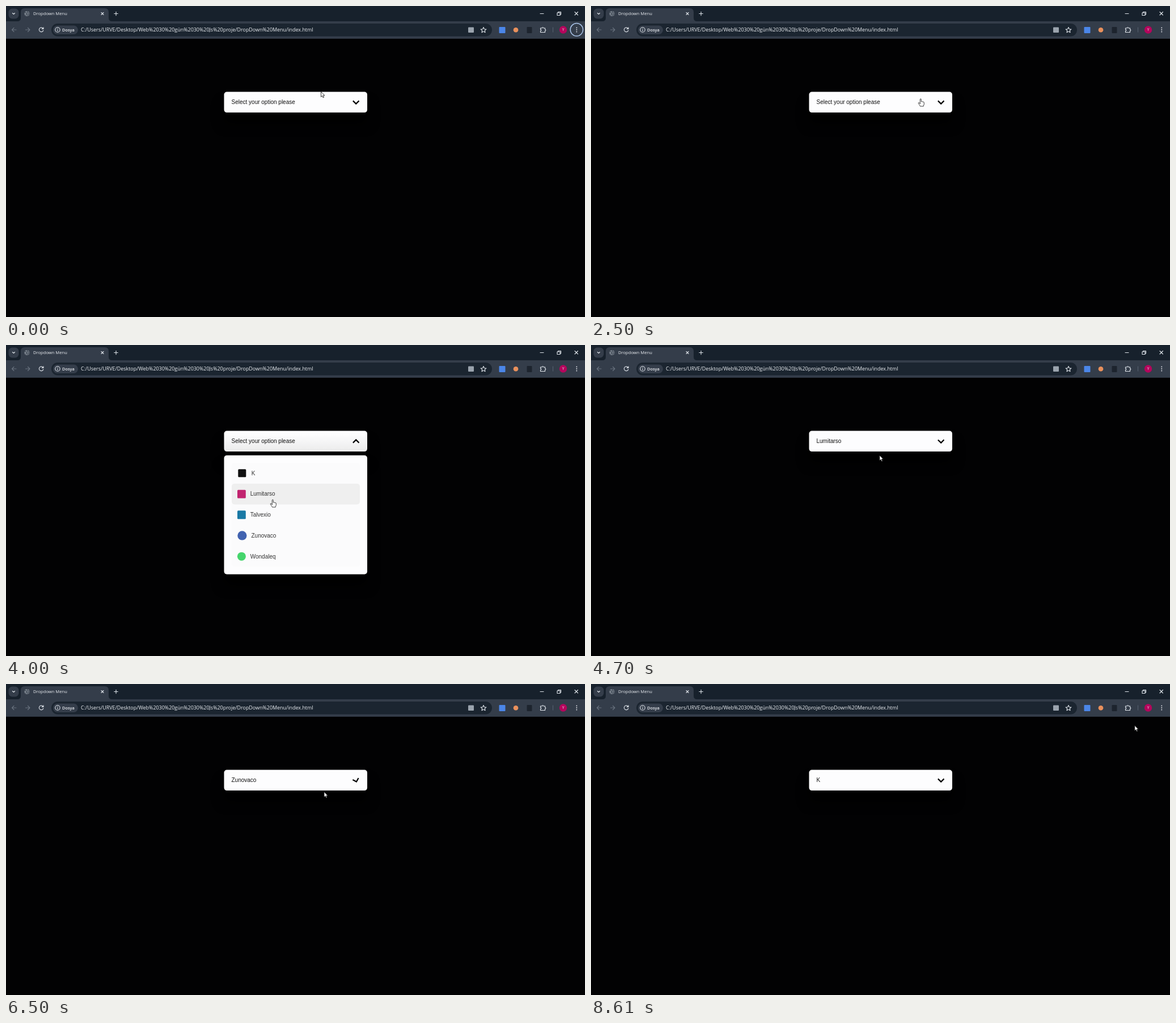
Recreate the animation shown at these times as an HTML page. Size 1021 by 549 pixels, loop 8.65 s.

```html
<!DOCTYPE html>
<html lang="tr">
<head>
<meta charset="utf-8">
<title>Dropdown Menu</title>
<style>
html, body { margin: 0; width: 100%; height: 100%; overflow: hidden; background: #020203; }
svg { display: block; }
.ui { font: 7.6px "Open Sans", "Noto Sans", sans-serif; fill: #eceff3; }
.ui .url { font-size: 8.94px; }
.ui .chip { font-size: 7.4px; font-weight: 600; }
.ui .badge { font-size: 6.5px; text-anchor: middle; }
.page { font: 10px "Liberation Sans", Arial, sans-serif; fill: #111; }
.line { fill: none; stroke: #dfe4ea; stroke-width: 1.1; stroke-linecap: round; stroke-linejoin: round; }
.line.dim { stroke: #69737f; }
.line.globe { stroke: #343d4a; }
.shadow { filter: drop-shadow(0 20px 10px #000); }
</style>
</head>
<body>
<svg width="1021" height="549" viewBox="0 0 1021 549">
  <defs>
    <linearGradient id="shade" x2="0" y2="1">
      <stop offset=".15" stop-color="#fdfdfe"/><stop offset="1" stop-color="#ebebeb"/>
    </linearGradient>
  </defs>

  <!-- browser window -->
  <g class="ui">
    <path fill="#17212c" d="M0 0H1021V27H0z"/>
    <path fill="#343d4a" d="M0 27H20Q26 27 26 21V11Q26 4 33 4H174Q181 4 181 11V21Q181 27 187 27H1021V57.700H0z"/>
    <rect x="4.5" y="4.5" width="18" height="18" rx="6.5" fill="#343d4a"/>
    <rect x="80" y="31" width="777" height="22.5" rx="11.2" fill="#1b2530"/>
    <rect x="83" y="34.5" width="44" height="15.5" rx="7.7" fill="#343d4a"/>
    <circle cx="37" cy="13.5" r="4.6" fill="#7c858f"/>
    <path class="line globe" d="M33.5 11.5l3 1 .5 2-2 1.5M37.5 9.5l1 2.5 2.5.5M38 17l1-2 2-.5"/>
    <path class="line" d="M11.5 12.500l2 2 2-2M168 11.500l4 4m0-4l-4 4M190.800 13.500h6.500m-3.250-3.250v6.500M942 13.500h6M1003 10.500l5.500 5.500m0-5.500l-5.500 5.500M972 12h5v4.500h-5zM973.500 12v-1.500h5v4.500h-1.500"/>
    <path class="line dim" d="M18 42h-7.500m3.500-3.500l-3.500 3.500 3.500 3.500M34.500 42h7.500m-3.500-3.500l3.500 3.500-3.500 3.500"/>
    <path class="line" d="M65.500 40a3.800 3.800 0 1 0 .3 3M66 37.800v2.600h-2.600"/>
    <circle class="line" cx="91" cy="42" r="4.2"/>
    <path class="line" d="M91 41.800v2.200m0-4.200v.1"/>
    <rect x="815" y="37.500" width="10" height="9.500" rx="1" fill="#9aa3ad"/>
    <path class="line" d="M842 37.500l1.400 3.200 3.400.3-2.600 2.300.8 3.400-3-1.800-3 1.800.8-3.400-2.600-2.300 3.400-.3z"/>
    <rect x="869.500" y="37" width="11" height="11" rx="1" fill="#4b86e8"/>
    <circle cx="899" cy="42.300" r="4.300" fill="#e9905c"/>
    <rect x="918.500" y="37" width="9" height="11" rx="1" fill="#1d242e"/>
    <path class="line" d="M942.500 39h2.700a1.300 1.300 0 0 1 2.600 0h2.700v2.200a1.300 1.300 0 0 1 0 2.600v2.700h-8v-2.500a1.300 1.300 0 0 0 0-2.600z"/>
    <path stroke="#566170" d="M964.500 37.500v9"/>
    <circle cx="982.500" cy="42" r="6.700" fill="#b5055c"/>
    <text class="badge" x="982.500" y="44.300">Y</text>
    <circle id="ring" cx="1006.300" cy="41.800" r="11.200" fill="#343d4a" stroke="#a9c3e8" stroke-width="1.500"/>
    <circle cx="1006.300" cy="38.500" r=".9"/>
    <circle cx="1006.300" cy="42" r=".9"/>
    <circle cx="1006.300" cy="45.500" r=".9"/>
    <text x="48" y="16.300">Dropdown Menu</text>
    <text class="chip" x="99" y="44.700">Dosya</text>
    <text class="url" x="132" y="45.400">C:/Users/URVE/Desktop/Web%2030%20gün%2030%20Js%20proje/DropDown%20Menu/index.html</text>
  </g>

  <!-- dropdown -->
  <g class="page">
    <rect id="head" class="shadow" x="384.500" y="151.600" width="252.500" height="36.500" rx="5"/>
    <text id="label" x="397.500" y="172.700"></text>
    <path id="chevron" fill="none" stroke="#000" stroke-width="2.200" d="M-5.300 -2.600L0 2.600 5.300 -2.600"/>
    <g id="menu">
      <rect class="shadow" x="384.500" y="194.700" width="252.500" height="210" rx="5" fill="#fdfdfe"/>
      <rect x="398" y="208" width="226" height="183.500" rx="5" fill="#fbfbfc"/>
      <rect id="hover" x="398" width="226" height="36.700" rx="5" fill="#efefef"/>
      <g id="items" fill="#333"></g>
    </g>
  </g>

  <g id="cursor" fill="#fff" stroke="#111" stroke-width=".8" stroke-linejoin="round">
    <path id="arrow" d="M0 0v9.200l2.100-1.900 1.500 3.300 1.500-.7-1.500-3.200h2.900z"/>
    <path id="hand" d="M-1 1.200Q-1 0 0 0T1 1.200V5q1-.7 1.800.2 1-.5 1.700.4 1.500-.5 1.500 1.200v2.400q0 1.500-1 3v1H-.8q-.5-1.500-2.200-3.600-1.500-2-.9-2.600.8-.7 2 .6L-1 9z"/>
  </g>
</svg>
<script>
const LOOP = 8650, TOP = 208, ROW = 36.7;
const $ = id => document.getElementById(id);
const show = (id, on) => $(id).style.display = on ? '' : 'none';

// name, text x, icon colour, icon centre x, icon half size, round icon
const items = [
  ['K', 432.7, '#111', 416.3, 7, 0],
  ['Lumitarso', 430.7, '#c1246f', 415.4, 7.4, 0],
  ['Talvexio', 430.7, '#1a79a5', 415.4, 7.4, 0],
  ['Zunovaco', 432.5, '#4162b0', 416.4, 8.1, 1],
  ['Wondaleq', 430.7, '#45d56c', 415.4, 7.5, 1]
];
$('items').innerHTML = items.map(([name, x, color, cx, r, round], i) => {
  const cy = TOP + ROW * (i + .5);
  return `<rect x="${cx - r}" y="${cy - r}" width="${2 * r}" height="${2 * r}" rx="${round ? r : 1.5}" fill="${color}"/>
    <text x="${x}" y="${cy + 3.4}">${name}</text>`;
}).join('');

// menu opens, closes, header text afterwards
const visits = [[2580, 4250, items[1][0]], [5190, 6180, items[3][0]], [7250, 7970, items[0][0]]];

// pointer: time, x, y
const path = [
  [0, 555.5, 151.3], [700, 581.3, 163.8], [2620, 581.3, 163.8], [3100, 466, 286],
  [3230, 464, 288.5], [3490, 472, 398], [3850, 474, 285], [4000, 470.3, 273],
  [4270, 470, 272], [4900, 521, 171], [5220, 521, 171], [5440, 518.3, 217.3],
  [5950, 482, 336], [6200, 482, 338], [6500, 561, 190.5], [6800, 574, 170],
  [7270, 574, 170], [7650, 520, 222], [7980, 522, 218], [8610, 958.8, 73.3], [LOOP, 958.8, 73.3]
];

function pointer(t) {
  const i = path.findIndex(k => k[0] > t);
  const [t0, x0, y0] = path[i - 1], [t1, x1, y1] = path[i];
  const u = (t - t0) / (t1 - t0), s = u * u * (3 - 2 * u);
  return [x0 + (x1 - x0) * s, y0 + (y1 - y0) * s];
}

// CSS "ease": cubic-bezier(.25, .1, .25, 1)
function ease(p) {
  if (p <= 0 || p >= 1) return p <= 0 ? 0 : 1;
  const bez = (u, a, b) => 3 * a * u * (1 - u) ** 2 + 3 * b * u * u * (1 - u) + u ** 3;
  let lo = 0, hi = 1;
  for (let i = 0; i < 20; i++) {
    const mid = (lo + hi) / 2;
    if (bez(mid, .25, .25) < p) lo = mid; else hi = mid;
  }
  return bez(lo, .1, 1);
}

const rowAt = ([x, y]) => x > 398 && x < 624 ? Math.floor((y - TOP) / ROW) : -1;
const isRow = row => row >= 0 && row < items.length;

function draw(t) {
  let open = false, turn = 0, label = 'Select your option please';
  for (const [from, to, name] of visits) {
    if (t >= from && t < to) open = true;
    if (t >= to) label = name;
    turn += ease((t - from) / 500) - ease((t - to) / 500);
  }
  const at = pointer(t), [x, y] = at;
  const row = rowAt(pointer(Math.max(0, t - 70))); // highlight lags the pointer
  const onHead = x > 384.5 && x < 637 && y > 151.6 && y < 188.1;
  const link = onHead || open && isRow(rowAt(at));

  show('ring', t < 450);
  show('menu', open);
  show('hover', isRow(row));
  $('hover').setAttribute('y', TOP + ROW * row);
  $('head').setAttribute('fill', open ? 'url(#shade)' : '#fdfdfe');
  $('label').textContent = label;
  $('chevron').setAttribute('transform', `translate(617.2 170) rotate(${-180 * turn})`);
  $('cursor').setAttribute('transform', `translate(${x} ${y})`);
  show('hand', link);
  show('arrow', !link);
}

function tick() {
  draw(performance.now() % LOOP);
  requestAnimationFrame(tick);
}
tick();
</script>
</body>
</html>
```
